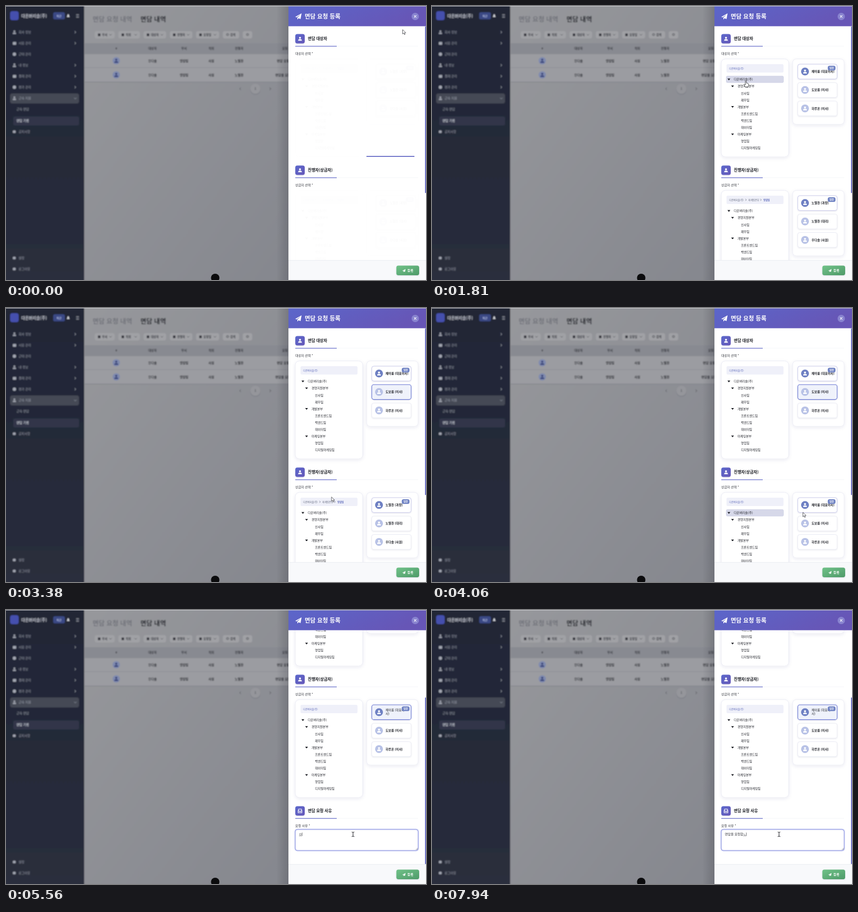
Animation of 800x523 px, one loop 8000 ms. Source, as an HTML page:

```html
<!DOCTYPE html>
<html lang="ko">
<head>
<meta charset="utf-8">
<style>
html, body { margin: 0; width: 100%; height: 100%; overflow: hidden; background: #8c8d93; }
svg { display: block; width: 100vw; height: 100vh; font-family: "Noto Sans CJK KR", "Noto Sans KR", "Noto Sans CJK", sans-serif; }
text { white-space: pre; }
</style>
</head>
<body>
<svg id="stage" viewBox="0 0 800 523" preserveAspectRatio="none">
<defs>
  <linearGradient id="side" x1="0" y1="0" x2="0" y2="1"><stop offset="0" stop-color="#202536"/><stop offset="1" stop-color="#2a2e3c"/></linearGradient>
  <linearGradient id="page" x1="0" y1="0" x2="1" y2="1"><stop offset="0" stop-color="#97989c"/><stop offset="1" stop-color="#85878e"/></linearGradient>
  <linearGradient id="head" x1="0" y1="0" x2="1" y2=".3"><stop offset="0" stop-color="#5b66ca"/><stop offset="1" stop-color="#6756b6"/></linearGradient>
  <linearGradient id="tile" x1="0" y1="0" x2="1" y2="1"><stop offset="0" stop-color="#5b69cc"/><stop offset="1" stop-color="#6657b8"/></linearGradient>
  <linearGradient id="green" x1="0" y1="0" x2="1" y2="1"><stop offset="0" stop-color="#70c288"/><stop offset="1" stop-color="#4f9a69"/></linearGradient>
  <linearGradient id="edge"><stop offset="0" stop-color="#20222c" stop-opacity="0"/><stop offset="1" stop-color="#20222c" stop-opacity=".2"/></linearGradient>
  <filter id="blur" x="-5%" y="-5%" width="110%" height="110%"><feGaussianBlur stdDeviation="1.1"/></filter>
  <filter id="soft" x="-20%" y="-20%" width="140%" height="150%"><feDropShadow dx="0" dy="2" stdDeviation="3" flood-color="#3a3f70" flood-opacity=".09"/></filter>
  <filter id="lift" x="-20%" y="-20%" width="140%" height="160%"><feDropShadow dx="0" dy="1" stdDeviation="1.2" flood-color="#3a3f70" flood-opacity=".14"/></filter>
  <clipPath id="view"><rect x="538" y="39" width="262" height="446"/></clipPath>
</defs>
<g id="back"></g>
<g id="drawer"></g>
<g id="cursor"></g>
</svg>
<script>
const $ = id => document.getElementById(id);
const LOOP = 8000, SCROLL = 181, GAP = 251;
const FIRM = '다온벼리솔(주)';
const TEAM = [['노별찬', '과장'], ['노별찬', '대리'], ['우다솔', '사원']];
const BOARD = [['채이룸', '대표이사'], ['도보름', '이사'], ['하루온', '이사']];

// y is the vertical middle of the line
const text = (x, y, s, size = 5.8, fill = '#25272e', weight = 500, extra = '') =>
  `<text x="${x}" y="${y + size * .37}" font-size="${size}" fill="${fill}" font-weight="${weight}" ${extra}>${s}</text>`;
const mid = (x, y, s, size, fill, weight) => text(x, y, s, size, fill, weight, 'text-anchor="middle"');
const rect = (x, y, w, h, r, fill, extra = '') =>
  `<rect x="${x}" y="${y}" width="${w}" height="${h}" rx="${r}" fill="${fill}" ${extra}/>`;
const disc = (x, y, r, fill) => `<circle cx="${x}" cy="${y}" r="${r}" fill="${fill}"/>`;
const path = (d, fill, extra = '') => `<path d="${d}" fill="${fill}" ${extra}/>`;
const line = (d, color, w = 1) => path(d, 'none', `stroke="${color}" stroke-width="${w}" stroke-linecap="round" stroke-linejoin="round"`);
const person = (x, y, k, fill) =>
  `<g transform="translate(${x} ${y}) scale(${k})">${disc(0, -1.7, 1.7, fill)}${path('M-3.2 3.4V2.8Q-3 .6-1 .6H1Q3 .6 3.2 2.8V3.4Z', fill)}</g>`;
const plane = (x, y, k) =>
  `<g transform="translate(${x} ${y}) scale(${k})">${path('M6-6L4 5L.2 3.3L-1.8 6L-2.2 2.4L4-4L-3.4 1.8L-6 .7Z', '#fff')}</g>`;
const chevron = (x, y, color, w = .8, k = 1) => line(`M${x - k} ${y - 2 * k}l${2 * k} ${2 * k}l${-2 * k} ${2 * k}`, color, w);

const clamp = v => Math.max(0, Math.min(1, v));
const smooth = v => (v = clamp(v), v * v * (3 - 2 * v));
const during = (t, a, b, fade = 130) => Math.min(clamp((t - a) / fade), clamp((b + fade - t) / fade));

function sidebar() {
  const ink = '#a2a6b1';
  let s = rect(-5, -5, 154, 533, 0, 'url(#side)') + rect(8, 10, 16, 17, 4, '#4550ad')
    + text(29, 19, FIRM, 7.8, '#c3c6cf', 700)
    + rect(90, 12, 22, 13.5, 3, '#3b4985') + mid(101, 19, '퇴근', 5, '#b6c0e6', 600)
    + path('M115.5 21Q117 19.500 117 18Q117 15.500 118.500 15.500T120 18Q120 19.500 121.500 21Z', '#d2d4da')
    + line('M134 16.500h4.500M134 19h4.500M134 21.500h4.500', '#a7abb5', .9)
    + rect(8, 167, 131, 19, 4, '#444855') + rect(14, 211, 125, 17, 3, '#30364a');
  ['회사 정보', '사원 관리', '근태 관리', '내 정보', '결재 관리', '평가 관리', '근속 지원'].forEach((label, i) => {
    const y = 50 + 21 * i;
    s += i % 3 == 0 ? person(16, y, 1, ink) : i % 3 == 1 ? rect(13, y - 2.5, 6.5, 5.5, 1, ink) : disc(16, y, 3.2, ink);
    s += text(24, y, label, 6, ink, 500);
    if (i == 6) s += line('M130 175.500l2 2l2-2', ink, .9);
    else if (i != 2) s += chevron(132, y, ink, .9);
  });
  s += text(20, 197, '근속 면담', 6, ink) + text(20, 219, '면담 기록', 6, '#c5c8d0', 600);
  [[240, '공지사항'], [481, '설정'], [502, '로그아웃']].forEach(([y, label]) =>
    s += rect(13, y - 2.5, 5.5, 5, 1.5, ink) + text(24, y, label, 6, ink));
  return s;
}

function page() {
  const ink = '#34363d', cols = [279, 339, 391, 444];
  let s = rect(140, -5, 410, 533, 0, 'url(#page)')
    + text(165, 25, '면담 요청 내역', 12.4, '#70727a', 700) + text(256, 25, '면담 내역', 12.3, '#1d1f26', 700);
  [[169, 38, '부서'], [214, 41, '직위'], [262, 43, '대상자'], [312, 43, '진행자'], [362, 44, '요청일'], [413, 31, '검색'], [451, 18, '']]
    .forEach(([x, w, label], i) => {
      s += rect(x, 48, w, 14, 4, '#a0a1a5') + text(x + 14, 55, label, 5.4, ink, 600);
      if (i < 5) s += rect(x + 6, 52.5, 5, 5, 1, ink) + line(`M${x + w - 10} 54l2 2l2-2`, ink, .8);
      else s += `<circle cx="${x + 9}" cy="54.500" r="2" fill="none" stroke="${ink}" stroke-width=".9"/>`;
    });
  s += rect(150, 71, 400, 74, 0, '#9b9ca1') + rect(150, 71, 400, 21, 0, '#888a91')
    + rect(150, 117.5, 400, .7, 0, '#86888e') + rect(150, 144.5, 400, 1.5, 0, '#83858c');
  s += mid(210, 81, '#', 5.5, ink, 600) + text(526, 81, '요청 사유', 5.8, ink, 600);
  ['대상자', '부서', '직위', '진행자'].forEach((c, i) => s += mid(cols[i], 81, c, 5.8, ink, 600));
  [104.5, 131.5].forEach((y, r) => {
    s += disc(210, y, 7, '#7f8aaf') + person(210, y, 1.2, '#343f78');
    [TEAM[2][0], '영업팀', '사원', TEAM[0][0]].forEach((c, i) => s += mid(cols[i], y, c, 6, '#25272d', 600));
    s += text(r ? 513 : 516, y, r ? '면담을 요청' : '면담 요청', 6, '#25272d', 600);
  });
  return s + disc(475, 160, 10, '#83858c') + disc(475, 158, 9.5, '#95969b') + mid(475, 158, '1', 6, ink, 500)
    + line('M447 156l-2 2l2 2', ink, .8) + line('M502.500 156l2 2l-2 2', ink, .8);
}

function section(y, title, label, inbox) {
  const icon = inbox
    ? line(`M556.500 ${y}l1-3.500h5l1 3.500v3.500h-7zM556.500 ${y}h2l.8 1.500h1.600l.8-1.500h2`, '#fff', 1.2)
    : person(560, y, 1.1, '#fff');
  return rect(551, y - 9, 18, 18, 4, 'url(#tile)', 'filter="url(#lift)"') + icon
    + text(575, y, title, 7.5, '#16181f', 700)
    + rect(551, y + 14, 234, .6, 0, '#eeeff5') + rect(551, y + 13.7, 79, 1.2, 0, '#6269c8')
    + text(551, y + 28, label + ' *', 6, '#2d3038', 500);
}

function tree(n) {
  const rows = [[0, FIRM], [1, '경영지원본부'], [2, '인사팀'], [2, '재무팀'], [1, '개발본부'], [2, '프론트엔드팀'],
    [2, '백엔드팀'], [2, '데이터팀'], [1, '마케팅본부'], [2, '영업팀'], [2, '디지털마케팅팀']];
  let s = rect(551, 101, 128.5, 187, 8, '#fff', 'stroke="#e6e7f1" stroke-width=".8" filter="url(#soft)"')
    + rect(561, 111, 108.5, 16, 2.5, '#eff0f9') + `<g id="crumb${n}"></g>`
    + rect(560.5, 133.7, 109, 12.6, 2, '#d6d8e9', `id="row${n}" opacity="0" stroke="#c0c4dc" stroke-width=".5"`);
  rows.forEach(([depth, name], i) => {
    const y = 140.2 + 13.1 * i, x = [575, 582, 588.5][depth];
    if (depth < 2) s += path(`M${x - 12.2} ${y - 1.6}h5.400l-2.700 3.300z`, '#17191f');
    s += text(x, y, name, 5.8, '#202229', 500);
  });
  return s;
}

const block = n => `<g id="block${n}" transform="translate(0 ${n * GAP})">${tree(n)}
  ${rect(687, 101, 98, 125, 7, '#fff', 'stroke="#e6e7f1" stroke-width=".8" filter="url(#soft)"')}<g id="list${n}"></g></g>`;

function drawer() {
  return rect(515, 0, 23, 523, 0, 'url(#edge)') + rect(538, 0, 262, 523, 0, '#fff')
    + `<g clip-path="url(#view)"><g id="scroll">`
    + section(62.5, '면담 대상자', '대상자 선택') + section(313.5, '진행자(상급자)', '상급자 선택')
    + block(0) + block(1) + rect(686.5, 286.2, 91.5, 1.8, .6, '#6368c4', 'id="bar"')
    + section(564.5, '면담 요청 사유', '요청 사유', true)
    + rect(549.8, 598.8, 236.4, 42.4, 5, 'none', 'id="glow" stroke="#dfe2fa" stroke-width="1.6"')
    + rect(551, 600, 234, 40, 4, '#fff', 'id="area"')
    + line('M781 638.500l3-3M783 638.500l1-1', '#55575e', .6)
    + text(558, 609, '', 6, '#25272e', 400, 'id="typed"')
    + rect(0, 611.8, 5.5, .5, 0, '#25272e', 'id="under"') + rect(0, 605.8, .6, 6.4, 0, '#17191f', 'id="caret"')
    + '</g></g>'
    + rect(798.2, 39, 1.8, 318, .8, '#6368c4', 'id="thumb"')
    + rect(538, 0, 262, 38.6, 0, 'url(#head)') + plane(557, 20, 1) + text(569, 20, '면담 요청 등록', 11.2, '#fff', 700)
    + disc(779.5, 20, 7, '#8883cf') + line('M777.700 18.200l3.600 3.600M781.300 18.200l-3.600 3.600', '#fff', 1.1)
    + rect(538, 485, 262, 38, 0, '#f8f9fb') + rect(538, 485, 262, .7, 0, '#e6e8ef')
    + rect(743.5, 495.5, 43.5, 18.5, 4, 'url(#green)', 'filter="url(#lift)"') + plane(758, 505, .5)
    + text(764.5, 505, '등록', 6.2, '#fff', 700)
    + disc(398.5, 519, 8, '#0b0b0d') + rect(0, 0, 800, .8, 0, '#d5d6da');
}

$('back').innerHTML = `<g filter="url(#blur)">${page()}${sidebar()}</g>`;
$('drawer').innerHTML = drawer();

function card([name, rank], i, on, hover) {
  const lead = i == 0, y = 111 + 35.2 * i;
  const stroke = on ? '#6876d2' : lead ? '#c3c4e8' : '#e9eaf3';
  const label = `${name} (${rank})`, wrap = on && rank.length > 3;
  return `<g transform="translate(0 ${-hover})">`
    + rect(696.7, y, 75, 28.4, 4, on ? '#eff2fb' : '#fff', `stroke="${stroke}" stroke-width="${on ? 1.1 : .9}" filter="url(#lift)"`)
    + disc(710.5, y + 14, 7.5, lead ? '#6e80c3' : '#b8c2e6') + person(710.5, y + 14, 1.1, '#fff')
    + (wrap ? text(723, y + 10, label.slice(0, -2)) + text(723, y + 17, label.slice(-2)) : text(723, y + 14, label, 5.8, '#202229', 600))
    + (lead ? rect(753.8, y + 3, 14.8, 9, 3.5, '#7184c4') + mid(761.2, y + 7.4, '팀장', 4.4, '#fff', 600) : '')
    + '</g>';
}

const crumbs = board => board ? text(566, 119, FIRM, 4.5, '#5a67b8', 500)
  : text(566, 119, FIRM, 4.5, '#61687d', 500) + chevron(598, 119, '#3f4660', .6, .8) + text(602.5, 119, '마케팅본부', 4.5, '#61687d', 500)
    + chevron(626.5, 119, '#3f4660', .6, .8) + text(631, 119, '영업팀', 4.5, '#5a67b8', 600);

// per block: root clicked, member clicked, chosen index, root hover span, card hovers [index, from, to]
const blocks = [
  { root: 1500, pick: 2800, pos: 1, row: [1180, 1900], hover: [[1, 640, 940], [1, 2400, 3050]] },
  { root: 3700, pick: 4350, pos: 0, row: [3430, 4090], hover: [[0, 4120, 4520]] }
];

// pointer stops: time, x, y
const stops = [[0, 755.5, 45], [120, 755.5, 45], [720, 715, 158], [850, 715, 158], [1290, 592, 142], [1720, 592, 142],
  [2480, 740, 166.5], [3000, 740, 166.5], [3500, 600, 393], [3810, 600, 393], [4060, 706.5, 390], [4260, 728, 380],
  [4500, 728, 380], [4810, 675.5, 415], [5020, 661, 428], [8000, 661, 428]];

function pointer(t) {
  const i = Math.max(1, stops.findIndex(s => s[0] > t)), [a, x, y] = stops[i - 1], [b, u, v] = stops[i];
  const k = smooth((t - a) / (b - a));
  return [x + (u - x) * k, y + (v - y) * k];
}

const shapes = {
  arrow: path('M0 0V8.400L2 6.600L3.400 9.700L4.800 9L3.400 6.100H6Z', '#fff', 'stroke="#24262c" stroke-width=".7" stroke-linejoin="round"'),
  hand: path('M-1 .8Q0-.8 1 .8V4.200Q2.200 3.500 2.600 4.600Q3.800 4 4.100 5.200Q5 5 5 6.300V8.500L4 11.500H-1.200L-4 7.400Q-3.800 5.800-2.400 6.600L-1 8Z', '#fff', 'stroke="#24262c" stroke-width=".8" stroke-linejoin="round"'),
  beam: line('M-2-4.200Q0-4.200 0-3.200Q0-4.200 2-4.200M0-3.200V3.700M-2 4.500Q0 4.500 0 3.500Q0 4.500 2 4.500', '#17191f', 1)
};

function shapeAt(x, y, scroll) {
  const py = y + scroll, ly = py > 340 ? py - GAP : py;
  if (x > 551 && x < 785 && py > 600 && py < 640) return 'beam';
  const overRow = x > 560 && x < 670 && ly > 133 && ly < 280;
  const overCard = x > 696 && x < 772 && ly > 110 && ly < 210 && (ly - 110) % 35.2 < 28.9;
  return overRow || overCard ? 'hand' : 'arrow';
}

// each word is a run of composing steps for its syllables
const strokes = ['ㅁ며면', 'ㄷ다담', 'ㅇ으을', ' ', 'ㅇ요', 'ㅊ처청', 'ㅎ하합', 'ㄴ니'];
const typing = [''];
strokes.reduce((done, steps) => {
  for (const c of steps) typing.push(done + c);
  return done + steps.at(-1);
}, '');

function typeIn(t) {
  const key = Math.max(0, Math.min(19, Math.floor((t - 6400) / 136) + 8));
  const value = typing[key], focus = t > 5200, node = $('typed');
  node.textContent = value || '면담 요청 사유를 입력해주세요';
  node.setAttribute('fill', value ? '#25272e' : '#73767f');
  const end = 558 + (value ? node.getComputedTextLength() : 0);
  $('under').setAttribute('x', end - 5.5);
  $('under').setAttribute('opacity', value && !value.endsWith(' ') ? 1 : 0);
  $('caret').setAttribute('x', end + .2);
  $('caret').setAttribute('opacity', focus ? 1 : 0);
  $('glow').setAttribute('opacity', focus ? 1 : 0);
  $('area').setAttribute('stroke', focus ? '#7882da' : '#d9dce6');
}

function render(t) {
  const scroll = SCROLL * smooth((t - 4520) / 240);
  $('scroll').setAttribute('transform', `translate(0 ${-scroll})`);
  $('thumb').setAttribute('y', 39 + 128 * scroll / SCROLL);
  const shown = .015 + .985 * smooth((t - 30) / 300);
  $('bar').setAttribute('opacity', t < 220 ? 1 : 0);
  blocks.forEach((b, n) => {
    const board = t >= b.root, enter = smooth((t - (board ? b.root : 30)) / 260);
    $('block' + n).setAttribute('opacity', shown);
    $('crumb' + n).innerHTML = crumbs(board);
    $('row' + n).setAttribute('opacity', during(t, ...b.row));
    const list = $('list' + n);
    list.setAttribute('transform', `translate(${8 * (1 - enter)} 0)`);
    list.setAttribute('opacity', board ? enter : 1);
    list.innerHTML = (board ? BOARD : TEAM).map((m, i) => {
      const hover = Math.max(0, ...b.hover.map(([k, from, to]) => k == i ? during(t, from, to) : 0));
      return card(m, i, t >= b.pick && i == b.pos, hover);
    }).join('');
  });
  typeIn(t);
  const [x, y] = pointer(t);
  $('cursor').innerHTML = shapes[shapeAt(x, y, scroll)];
  $('cursor').setAttribute('transform', `translate(${x} ${y})`);
}

const start = performance.now();
function tick() {
  render((performance.now() - start) % LOOP);
  requestAnimationFrame(tick);
}
tick();
</script>
</body>
</html>
```
